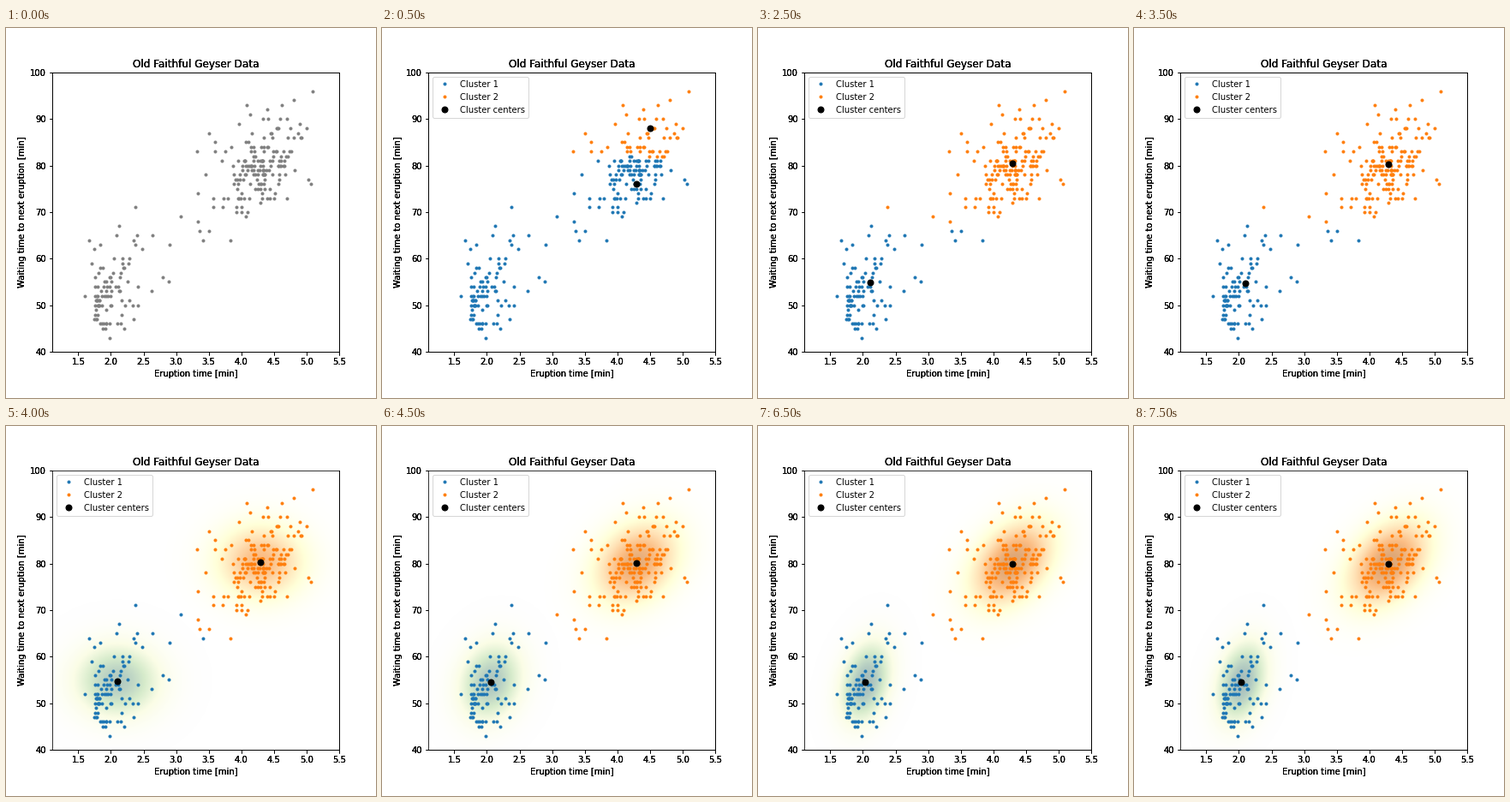
A matplotlib script that plays this animation: 432 by 432 pixels, repeating every 8000 ms.

```python
import numpy as np
import matplotlib.pyplot as plt
from matplotlib.animation import FuncAnimation
from matplotlib.colors import LinearSegmentedColormap

FRAMES, INTERVAL = 16, 500
EM_START = 8
XLIM, YLIM = (1.1, 5.5), (40, 100)

# Points on the rim of the two groups; the dense middles are generated.
SHORT_RIM = [
    (1.6, 52), (1.67, 64), (1.75, 62), (2.13, 67), (2.08, 65), (2.38, 71),
    (2.4, 65), (2.64, 65), (2.35, 64), (2.37, 63), (2.48, 62), (2.62, 53),
    (2.8, 56), (2.89, 55), (2.9, 63), (1.98, 43), (2.2, 45), (2.35, 47),
    (2.17, 48), (2.15, 46), (2.42, 54), (2.42, 50), (2.33, 50), (1.87, 45),
    (1.92, 45), (1.75, 47), (1.71, 59), (1.83, 63),
]
LONG_RIM = [
    (3.07, 69), (3.32, 83), (3.33, 74), (3.33, 68), (3.36, 66), (3.417, 64),
    (3.5, 66), (3.83, 64), (3.5, 87), (3.6, 85), (3.6, 83), (3.45, 78),
    (3.57, 73), (3.57, 71), (3.72, 71), (3.92, 70), (3.92, 71), (4.0, 70),
    (4.0, 71), (4.09, 70), (4.07, 69), (4.29, 72), (4.5, 73), (4.7, 73),
    (4.08, 93), (4.14, 91), (4.4, 92), (4.62, 93), (4.8, 94), (5.1, 96),
    (3.96, 89), (4.33, 90), (4.41, 90), (4.6, 90), (4.7, 90), (4.9, 89),
    (5.0, 88), (4.93, 86), (5.03, 77), (5.07, 76),
]


def make_data():
    rng = np.random.default_rng(7)
    x1 = 1.76 + 0.53 * rng.random(70) ** 1.7
    y1 = rng.normal(53 + 9 * (x1 - 1.95), 4.2).clip(46, 60)
    x2 = rng.normal(4.34, 0.28, 134).clip(3.7, 4.93)
    y2 = rng.normal(80 + 5 * (x2 - 4.34), 4.1).clip(73, 88)
    bulk = np.column_stack([np.r_[x1, x2], np.r_[y1, y2].round()])
    return np.vstack([SHORT_RIM, LONG_RIM, bulk])


DATA = make_data()

# Centers of the k-means iterations, short eruptions first
KMEANS = np.array([
    [(4.3, 76), (4.5, 88)],
    [(3.2, 65), (4.41, 86)],
    [(2.6, 59.3), (4.35, 82.2)],
    [(2.2, 55.7), (4.31, 80.9)],
    [(2.11, 54.9), (4.3, 80.4)],
    [(2.094, 54.75), (4.298, 80.285)],
])
FINAL_MEANS = np.array([(2.036, 54.48), (4.29, 79.97)])
FINAL_COVS = np.array([[(0.069, 0.435), (0.435, 33.7)],
                       [(0.17, 0.94), (0.94, 36.0)]])
START_COVS = np.array([np.diag([0.45, 5.35]) ** 2] * 2)
FINAL_WEIGHTS = np.array([0.356, 0.644])
PEAK = 0.043

SHORT_MAP = LinearSegmentedColormap.from_list(
    "short", ["#ffffff", "#fbfde6", "#d6ebcb", "#b5cdc2", "#9fb4b8"])
LONG_MAP = LinearSegmentedColormap.from_list(
    "long", ["#ffffff", "#ffffd8", "#ffe0b4", "#fbbd84", "#dfa878"])


def mixture(step):
    """Weights, means and covariances, converging geometrically."""
    rest = 0.3 ** step

    def blend(start, final):
        return final + (start - final) * rest

    return (blend(0.5, FINAL_WEIGHTS), blend(KMEANS[-1], FINAL_MEANS),
            blend(START_COVS, FINAL_COVS))


def densities(points, params):
    result = []
    for weight, mean, cov in zip(*params):
        d = points - mean
        q = np.einsum("...i,ij,...j", d, np.linalg.inv(cov), d)
        norm = 2 * np.pi * np.sqrt(np.linalg.det(cov))
        result.append(weight * np.exp(-q / 2) / norm)
    return np.array(result)


def dress(ax):
    ax.set(xlim=XLIM, ylim=YLIM, facecolor="none",
           xticks=np.arange(1.5, 5.6, 0.5), yticks=range(40, 101, 10),
           title="Old Faithful Geyser Data", xlabel="Eruption time [min]",
           ylabel="Waiting time to next eruption [min]")


plt.rcParams["font.family"] = "DejaVu Sans"
fig = plt.figure(figsize=(6, 6), dpi=72, facecolor="white")
# Stacked identical axes give the heavy lettering.
for layer in range(3):
    ax = fig.add_axes([0.125, 0.125, 0.775, 0.755], label=str(layer))
    dress(ax)

grid = np.stack(np.meshgrid(np.linspace(*XLIM, 335),
                            np.linspace(*YLIM, 326)), axis=-1)
cloud = ax.imshow(np.ones(grid.shape[:2] + (3,)), extent=XLIM + YLIM,
                  origin="lower", aspect="auto", zorder=0)


def dots(color, size=3, **kwargs):
    return ax.plot([], [], "o", color=color, ms=size, **kwargs)[0]


plain = dots("gray")
groups = [dots("C0", label="Cluster 1"), dots("C1", label="Cluster 2")]
centers = dots("black", 7, label="Cluster centers", zorder=4)
legend = ax.legend(loc="upper left")
dress(ax)


def update(frame):
    clustered = frame > 0
    fitting = frame >= EM_START
    plain.set_data(*DATA.T)
    plain.set_visible(not clustered)
    for artist in (*groups, centers, legend):
        artist.set_visible(clustered)
    cloud.set_visible(fitting)
    if not clustered:
        return []

    if fitting:
        params = mixture(frame - EM_START)
        means = params[1]
        labels = densities(DATA, params).argmax(axis=0)
        short, long = densities(grid, params) / PEAK
        cloud.set_data(SHORT_MAP(short)[..., :3] * LONG_MAP(long)[..., :3])
    else:
        means = KMEANS[min(frame, len(KMEANS)) - 1]
        distance = np.linalg.norm(DATA[None] - means[:, None], axis=-1)
        labels = distance.argmin(axis=0)

    for k, group in enumerate(groups):
        group.set_data(*DATA[labels == k].T)
    centers.set_data(*means.T)
    return []


anim = FuncAnimation(fig, update, frames=FRAMES, interval=INTERVAL,
                     repeat=True, repeat_delay=0)
plt.show()
```
